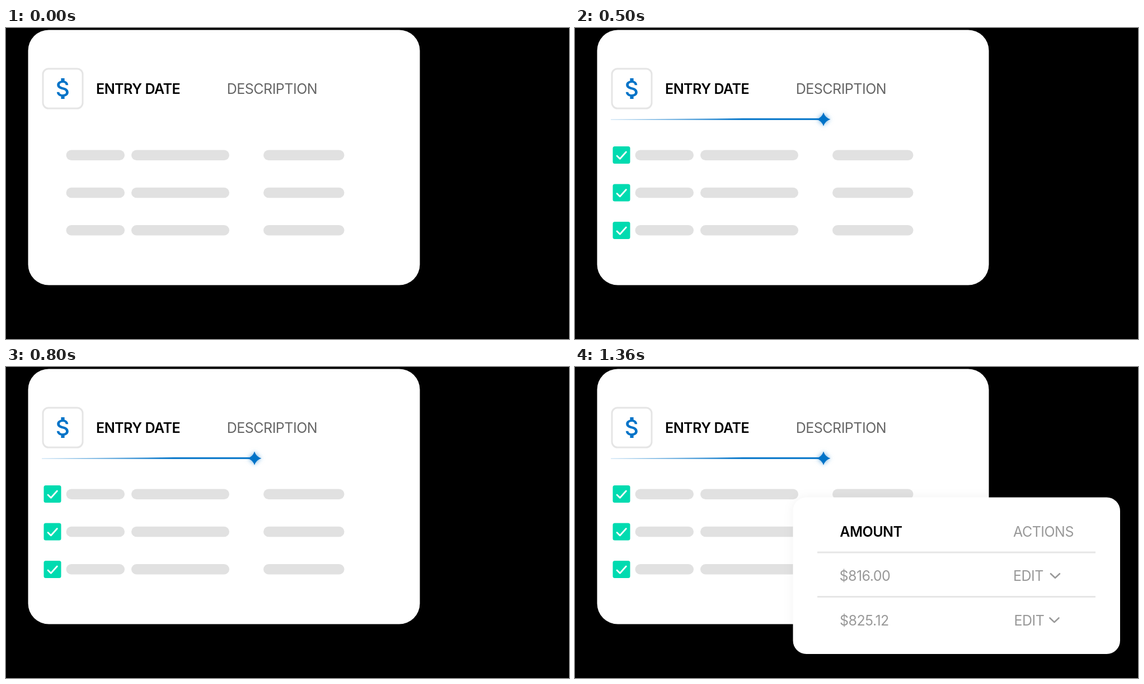
Write an HTML page that moves like this. It is 1006 by 557 pixels and loops after 1.6 s.

```html
<!DOCTYPE html>
<html lang="en">
<head>
<meta charset="utf-8">
<title>Entries table</title>
<style>
  html, body { margin: 0; width: 100%; height: 100%; overflow: hidden; background: #000; }
  svg { display: block; }
  text { font: 400 25px Inter, sans-serif; letter-spacing: -.02em; fill: #999; }
  .head { font-weight: 600; fill: #000; }
  .shadow { filter: drop-shadow(0 0 9px rgba(0, 0, 0, .05)); }
  .glow { filter: drop-shadow(0 0 4px rgba(0, 115, 200, .6)); }
</style>
</head>
<body>
<svg width="1006" height="557" viewBox="0 0 1006 557">
  <defs>
    <linearGradient id="trail" gradientUnits="userSpaceOnUse" x1="64" y1="0" x2="300" y2="0">
      <stop offset="0" stop-color="#0073c8" stop-opacity=".25"/>
      <stop offset="1" stop-color="#0073c8"/>
    </linearGradient>
    <g id="bars" fill="#e1e1e1">
      <rect x="107.5" width="104.5" height="18.5" rx="9.25"/>
      <rect x="224" width="175" height="18.5" rx="9.25"/>
      <rect x="460" width="144.5" height="18.5" rx="9.25"/>
    </g>
    <g id="check">
      <rect x="67.5" width="31" height="31" rx="3.5" fill="#00dbb0"/>
      <path d="M75 17l5.3 5.3L91.3 10" fill="none" stroke="#fff" stroke-width="2.8" stroke-linecap="round" stroke-linejoin="round"/>
    </g>
    <path id="chevron" d="M0 0l8 7.6L16 0" fill="none" stroke="#999" stroke-width="2.6" stroke-linecap="round" stroke-linejoin="round"/>
  </defs>

  <rect x="39.5" y="3.5" width="700" height="457" rx="37" fill="#fff"/>
  <rect x="66" y="73" width="71" height="71" rx="10" fill="#fff" stroke="#e5e5e5" stroke-width="3"/>
  <path transform="translate(77.8 83.8) scale(2.06)" fill="#0073c8" d="M11.8 10.9c-2.27-.59-3-1.2-3-2.15 0-1.09 1.01-1.85 2.7-1.85 1.78 0 2.44.85 2.5 2.1h2.21c-.07-1.72-1.12-3.3-3.21-3.81V3h-3v2.16c-1.94.42-3.5 1.68-3.5 3.61 0 2.31 1.91 3.46 4.7 4.13 2.5.6 3 1.48 3 2.41 0 .69-.49 1.79-2.7 1.79-2.06 0-2.87-.92-2.98-2.1h-2.2c.12 2.19 1.76 3.42 3.68 3.83V21h3v-2.15c1.95-.37 3.5-1.5 3.5-3.55 0-2.84-2.43-3.81-4.7-4.4z"/>
  <text class="head" x="161" y="118">ENTRY DATE</text>
  <text x="394.7" y="118" style="fill:#666">DESCRIPTION</text>
  <use href="#bars" y="218.5"/>
  <use href="#bars" y="285.8"/>
  <use href="#bars" y="353"/>

  <g id="checked" visibility="hidden">
    <path d="M64 163.6L300 161.8H438V164.8H300L64 164.6z" fill="url(#trail)"/>
    <path class="glow" d="M444 151.2Q447 160.5 456.3 163.5Q447 166.5 444 175.8Q441 166.5 431.7 163.5Q441 160.5 444 151.2z" fill="#0073c8"/>
    <use href="#check" y="212"/>
    <use href="#check" y="279.5"/>
    <use href="#check" y="347"/>
  </g>

  <g id="amounts" visibility="hidden">
    <rect class="shadow" x="389.5" y="233.5" width="584.5" height="280.5" rx="24" fill="#fff"/>
    <text class="head" x="473.2" y="303.5">AMOUNT</text>
    <text x="783" y="303.5">ACTIONS</text>
    <path d="M433 332H930M433 411.5H930" stroke="#e6e6e6" stroke-width="3"/>
    <text x="472.4" y="383">$816.00</text>
    <text x="783" y="383">EDIT</text>
    <use href="#chevron" x="850" y="370.2"/>
    <text x="473" y="462.5">$825.12</text>
    <text x="784.5" y="462.5">EDIT</text>
    <use href="#chevron" x="848.5" y="449.5"/>
  </g>
</svg>
<script>
  const LOOP = 1600;
  const show = (id, on) =>
    document.getElementById(id).setAttribute("visibility", on ? "visible" : "hidden");

  function draw() {
    const t = performance.now() % LOOP;
    show("checked", t >= 500);
    show("amounts", t >= 1000);
    requestAnimationFrame(draw);
  }
  draw();
</script>
</body>
</html>
```
